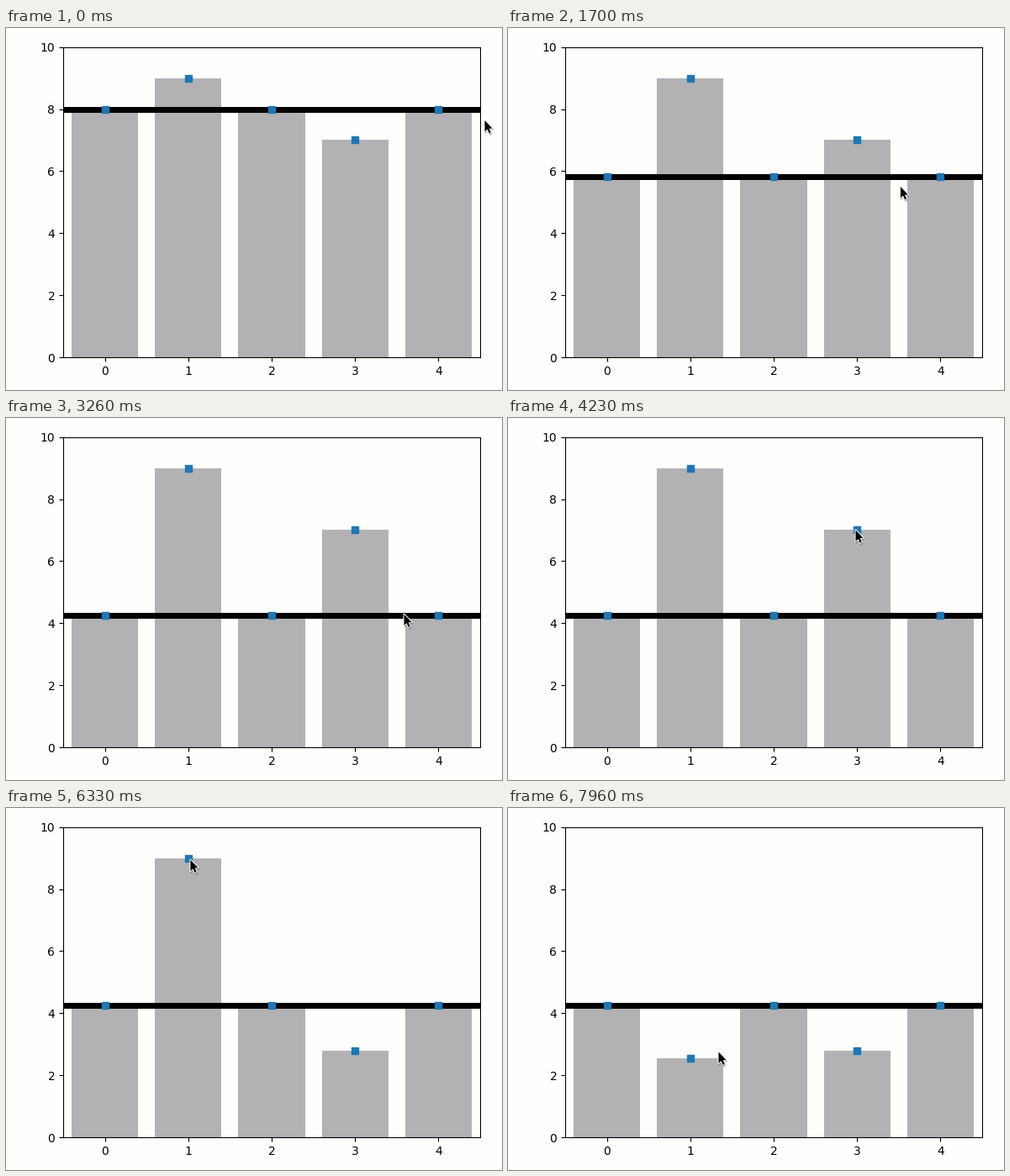
A matplotlib script for the animation above (8000 ms loop, 590x431 px).

```python
import numpy as np
import matplotlib.pyplot as plt
from matplotlib.animation import FuncAnimation
from matplotlib.patches import Polygon

W, H, DPI = 590, 431, 100
FRAMES, STEP = 250, 32
LEFT, BASE, AX_W, AX_H = 68, 392.2, 496, 369.6
UNIT = AX_H / 10
PAPER, GREY, BLUE = "#fefefd", "#b2b1b3", "#1f77b4"
LAG = 85  # ms that the plot trails the pointer


def glide(s):
    return s * s * (3 - 2 * s)


def pull(s):
    return 1 - (1 - s) ** 1.2


# Pointer moves: start and end in ms, end point, easing
HOME = np.array([570, 110])
MOVES = [
    (15, 690, (452, 95), glide),
    (1030, 1150, (453, 92), glide),       # grab the line, pull it down
    (1150, 2060, (474, 233.6), pull),
    (3245, 4020, (414, 135), glide),
    (4200, 4300, (414, 130.5), glide),    # grab bar 3
    (4300, 4860, (419, 288), glide),
    (5285, 6050, (222, 62), glide),
    (6300, 6350, (216, 61), glide),
    (6600, 6700, (217, 56.4), glide),     # grab bar 1
    (6700, 7400, (224, 292), glide),
    (7400, 7580, (225, 297), glide),
    (7905, 7950, (251, 290.5), glide),
]


def pointer(t):
    pos = HOME
    for start, end, goal, ease in MOVES:
        s = np.clip((t - start) / (end - start), 0, 1)
        pos = pos + (np.array(goal) - pos) * ease(s)
    return pos


def to_y(value):
    return BASE - UNIT * value


def dragged(t, start, end, v0, v1):
    """Value that follows the pointer between start and end."""
    u = np.clip(t - LAG, start, end)
    k = (u - start) / (end - start)
    grab = (1 - k) * (to_y(v0) - pointer(start)[1]) + k * (to_y(v1) - pointer(end)[1])
    return (BASE - pointer(u)[1] - grab) / UNIT


fig = plt.figure(figsize=(W / DPI, H / DPI + 1e-9), dpi=DPI, facecolor=PAPER)
ax = fig.add_axes([LEFT / W, 1 - BASE / H, AX_W / W, AX_H / H], facecolor=PAPER)
ax.set(xlim=(-0.5, 4.5), ylim=(0, 10), xticks=range(5), yticks=range(0, 11, 2))
bars = ax.bar(range(5), 8, color=GREY)
level = ax.axhline(8, color="black", lw=5)
dots, = ax.plot(range(5), [8] * 5, "s", color=BLUE, ms=6, zorder=3)

stage = fig.add_axes([0, 0, 1, 1])
stage.set(xlim=(0, W), ylim=(H, 0))
stage.axis("off")

ARROW = np.array([(0, 0), (0, 13.4), (3, 10.6), (5.2, 15.4), (7.3, 14.5),
                  (5.2, 9.8), (9, 9.5)])
parts = []


def add_arrow(drop, color, width, alpha=1):
    patch = Polygon(ARROW, facecolor=color, edgecolor=color, lw=width * 72 / DPI,
                    alpha=alpha, joinstyle="round")
    stage.add_patch(patch)
    parts.append((patch, np.array([drop / 2, drop])))


add_arrow(1.6, "black", 2.6, 0.12)
add_arrow(1.2, "black", 1.2, 0.18)
add_arrow(0, "white", 2)
add_arrow(0, "black", 0)


def update(frame):
    t = (frame + 0.5) * STEP
    line = dragged(t, 1030, 2060, 8, 4.25)
    values = [line, dragged(t, 6600, 7580, 9, 2.55), line,
              dragged(t, 4200, 4860, 7, 2.8), line]
    for bar, value in zip(bars, values):
        bar.set_height(value)
    level.set_ydata([line, line])
    dots.set_ydata(values)
    tip = pointer(t) + (-0.5, 0)
    for patch, shift in parts:
        patch.set_xy(ARROW + tip + shift)
    return [*bars, level, dots, *(patch for patch, _ in parts)]


anim = FuncAnimation(fig, update, frames=FRAMES, interval=STEP, repeat=True,
                     repeat_delay=0, blit=False)
plt.show()
```
